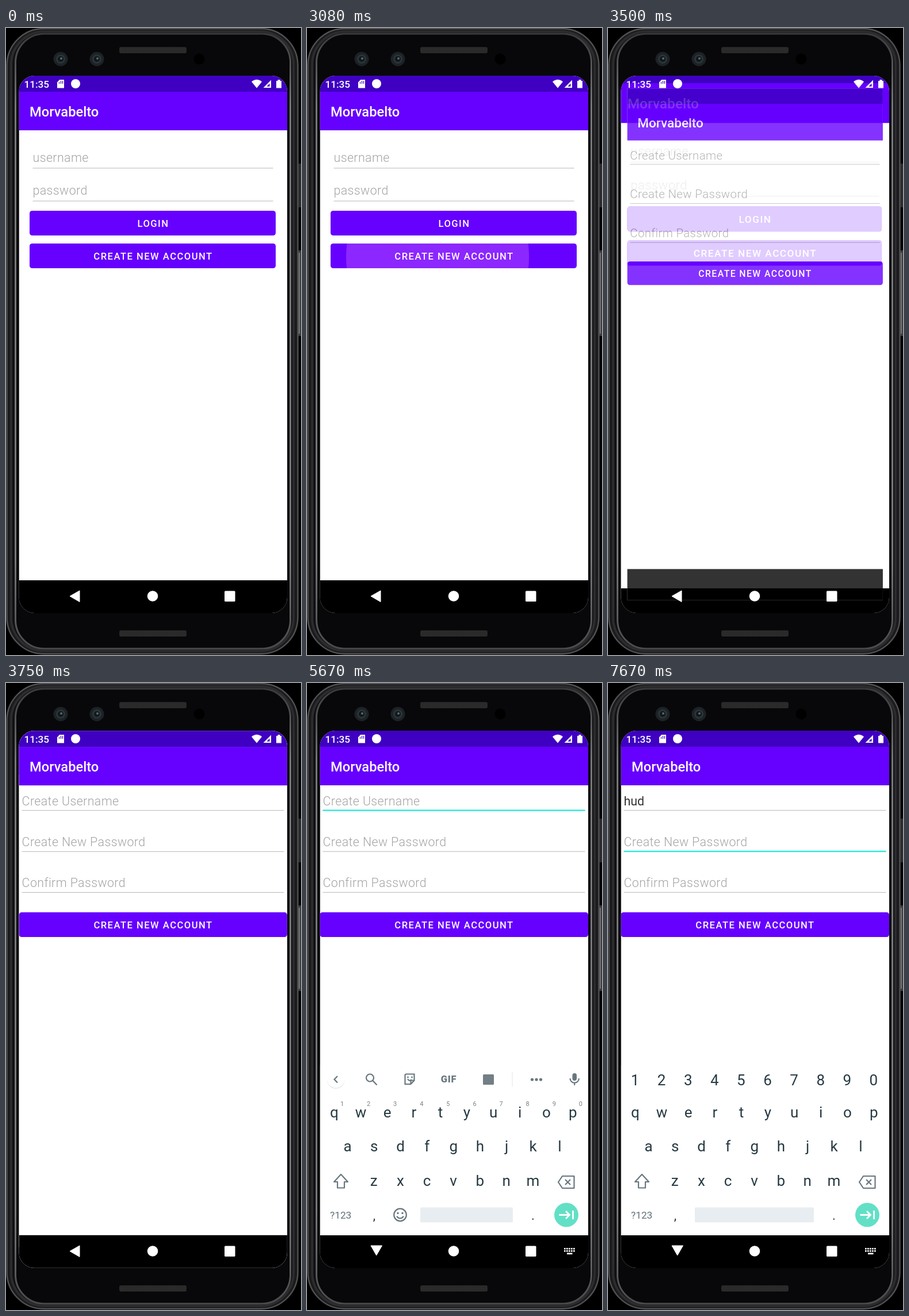
Write an HTML page that moves like this. It is 513 px wide and 1091 px high and loops after 8 s.

```html
<!DOCTYPE html>
<html lang="en">
<head>
<meta charset="utf-8">
<title>Sign-up flow</title>
<style>
html, body { margin: 0; width: 100%; height: 100%; overflow: hidden; background: #000; }
svg { display: block; width: 513px; height: 1091px; font-family: Roboto, sans-serif; }
.hint { font-size: 21.4px; font-weight: 300; letter-spacing: .4px; fill: #a4a4a4; }
.value { font-size: 21.4px; fill: #333; }
.btn { font-size: 16.6px; font-weight: 500; letter-spacing: 1.48px; fill: #fff; text-anchor: middle; }
.title { font-size: 23.7px; font-weight: 500; fill: #fff; }
.key { font-size: 26px; fill: #263a42; text-anchor: middle; }
.mini { font-size: 11px; fill: #75838a; text-anchor: middle; }
.word { font-size: 19px; fill: #3c4a50; text-anchor: middle; }
.icon { fill: none; stroke: #68777e; stroke-width: 2.2; }
</style>
</head>
<body>
<svg id="stage" viewBox="0 0 513 1091" xmlns="http://www.w3.org/2000/svg"></svg>
<script>
const LOOP = 8000, STEP = 1000 / 12;
const PURPLE = '#6600ff', DARK = '#3f00c2', CYAN = '#2fe8dc', APP = 'Morvabelto', USER = 'hud';

const rect = (x, y, w, h, fill, more = '') =>
  `<rect x="${x}" y="${y}" width="${w}" height="${h}" fill="${fill}" ${more}/>`;
const circle = (x, y, r, fill, more = '') =>
  `<circle cx="${x}" cy="${y}" r="${r}" fill="${fill}" ${more}/>`;
const path = (d, fill, more = '') => `<path d="${d}" fill="${fill}" ${more}/>`;
const text = (x, y, cls, s, more = '') => `<text x="${x}" y="${y}" class="${cls}" ${more}>${s}</text>`;
const group = (id, body, more = '') => `<g id="${id}" ${more}>${body}</g>`;
const icon = (d, more = '') => `<path class="icon" d="${d}" ${more}/>`;

function phone() {
  const grille = y => rect(197, y, 117, 11, '#262626', 'rx="3"') + rect(198, y + 1, 115, 9, 'url(#mesh)');
  const lens = x => circle(x, 54, 12.5, '#1c2225') + circle(x, 54, 8, '#2b3438') +
    circle(x, 54, 5, '#12181b') + circle(x + 1, 53, 2, '#59686e');
  return rect(506, 236, 9, 76, '#2b2b2d', 'rx="2"') +
    rect(506, 387, 9, 149, '#3a3a3c', 'rx="2"') + rect(509, 391, 2, 141, '#777') +
    rect(1.5, 1, 506, 1088, '#1b1b1d', 'rx="64" stroke="#525254" stroke-width="2.4"') +
    rect(9, 6, 491, 1078, '#111113', 'rx="58" stroke="#2c2c2e" stroke-width="4"') +
    rect(16.5, 10, 478, 1070, '#08080a', 'rx="50" stroke="url(#rim)" stroke-width="3"') +
    rect(20, 13, 471, 1064, '#08080a', 'rx="47"') +
    grille(33) + grille(1048) + lens(95) + lens(158) + circle(336, 54, 9.5, '#000');
}

function windowBase() {
  return rect(22.5, 83, 466.5, 935, '#fff') + rect(22.5, 83, 466.5, 28.5, DARK) +
    rect(22.5, 111, 466.5, 67, PURPLE) + text(41, 154, 'title', APP) +
    rect(22.5, 961, 466.5, 57, '#000');
}
const line = (x, y, w) => rect(x, y, w, 1.1, '#bdbdbd');
const button = (x, y, w, label) => rect(x, y, w, 43, PURPLE, 'rx="4.5"');

function loginScreen() {
  return windowBase() + text(46.5, 233, 'hint', 'username') + line(46.5, 243.3, 418) +
    text(46.5, 290, 'hint', 'password') + line(46.5, 300.5, 418) +
    button(41, 318, 428) + text(256, 346, 'btn', 'LOGIN') +
    button(41, 375, 428) +
    group('ripple', '<circle id="wave" cy="398" fill="#8c27ff"/>', 'clip-path="url(#tap)"') +
    text(256, 403, 'btn', 'CREATE NEW ACCOUNT');
}

function signupScreen() {
  return windowBase() + text(27.5, 212.5, 'hint', 'Create Username', 'id="nameHint"') +
    text(27.5, 212.5, 'value', '', 'id="name"') +
    text(27.5, 283.7, 'hint', 'Create New Password') + text(27.5, 355, 'hint', 'Confirm Password') +
    [221, 292.6, 363.8].map(y => line(27.5, y, 456)).join('') +
    rect(27.5, 220.4, 456, 2.4, CYAN, 'id="focus"') + rect(27, 192, 2, 25, CYAN, 'id="caret"') +
    button(22.5, 399, 466.5) + text(256, 427, 'btn', 'CREATE NEW ACCOUNT');
}

function statusIcons() {
  return text(31.5, 103.5, '', '11:35', 'font-size="17.2" font-weight="500" fill="#fff"') +
    path('M93 90h8v14.5h-12v-10z', '#fff') +
    path('M92.5 94v3M95.5 92v5M98.5 92v5', 'none', `stroke="${DARK}" stroke-width="1.2"`) +
    circle(121, 97, 8, '#fff') +
    path('M427 93.5Q436 86 445 93.5L436 104.500z', '#fff') +
    path('M461 90.500V104H447.500z', '#fff') + path('M458.500 96.500v5.200h-5.200z', DARK) +
    path('M470 92h2.500v-2h4v2h2.500v12.500h-9z', '#fff');
}

function navIcons() {
  const dots = Array.from({length: 10}, (_, i) =>
    rect(447 + (i % 5) * 4, 983 + (i / 5 | 0) * 4, 2.7, 2.7, '#fff')).join('');
  return group('back', path('M111 988.700L128 979V998.500z', '#fff', 'stroke="#fff" stroke-linejoin="round"')) +
    circle(255, 988.5, 9.3, '#fff') + rect(380, 979.500, 18.500, 18.500, '#fff', 'rx="1.5"') +
    group('down', path('M111 979H130.500L120.700 996z', '#fff', 'stroke="#fff" stroke-linejoin="round"') +
      dots + rect(452, 991.500, 9.500, 2.700, '#fff'));
}

function keyboard() {
  const row = (s, x, y, cls = 'key', gap = 46.1) =>
    [...s].map((c, i) => text((x + gap * i).toFixed(1), y, cls, c)).join('');
  const arrow = icon('M59 855l-12 13h6v10.500h12V868h6z', 'stroke-linejoin="round"');
  const erase = icon('M444 858h20.500v21H444l-7-10.500zM449 864l9 9m0-9l-9 9', 'stroke-linejoin="round"');
  const enter = circle(451, 925.500, 21, '#62e0c6') +
    path('M438.500 925.500h18m-6.500-6.500l6.500 6.500-6.500 6.500M462.500 918v15', 'none', 'stroke="#fff" stroke-width="2.8"');
  const mic = group('mic', rect(461.500, 679, 7.500, 13, '#68777e', 'rx="3.700"') +
    icon('M457.500 688a7.700 7.700 0 0 0 15.400 0M465.200 696v4', 'stroke-width="2"'));
  const tools = group('tools',
    circle(50, 691, 15, '#e6e8e9') + circle(50, 689.500, 15, '#fff') + icon('M53 684l-5.500 5.700 5.500 5.700') +
    `<circle class="icon" cx="109.500" cy="687" r="6.500"/>` + icon('M114 691.500l7.500 8') +
    icon('M172 680.500h14.500v11l-6 6.500H170.500V682zM186.500 691.500h-6v6.500M175 689q3 5 7 1') +
    circle(175.5, 686, 1.4, '#68777e') + circle(182.5, 686, 1.4, '#68777e') +
    text(246.500, 695, '', 'GIF', 'font-size="16.500" font-weight="900" fill="#68777e" text-anchor="middle" letter-spacing=".8"') +
    rect(306, 681, 19, 18, '#737f85', 'rx="1.500"') + rect(356.500, 677, 1, 25, '#dfe3e5') +
    [391.500, 399, 406.500].map(x => circle(x, 690, 2.600, '#68777e')).join(''));
  const words = group('words', icon('M47 684l5.500 5.700-5.500 5.700') +
    [125, 246, 368].map(x => text(x, 696, 'word', '')).join('') +
    rect(185, 680, 1, 19, '#dfe3e5') + rect(307, 680, 1, 19, '#dfe3e5'));
  const smile = group('smile', `<circle class="icon" cx="162" cy="925.500" r="10.800"/>` +
    circle(158, 922.5, 1.7, '#68777e') + circle(166, 922.5, 1.7, '#68777e') + icon('M156 928q6 7 12 0'));
  return rect(22.5, 665, 466.5, 296, '#fff') + tools + words + mic +
    group('minis', row('1234567890', 61, 736, 'mini')) + group('digits', row('1234567890', 47, 700)) +
    row('qwertyuiop', 47.5, 756) + row('asdfghjkl', 70.5, 815) + row('zxcvbnm', 116.3, 875) +
    arrow + erase + text(40, 932, '', '?123', 'font-size="17.300" fill="#5f6f76"') +
    text(117, 934, 'key', ',', 'style="font-size:22px"') + text(393, 934, 'key', '.', 'style="font-size:22px"') +
    smile + rect(197, 912.500, 161, 26, '#e8edf1', 'id="space" rx="1.500"') + enter;
}

const stage = document.getElementById('stage');
stage.innerHTML = `<defs>
  <linearGradient id="rim" x1="0" y1="0" x2="0" y2="1">
    <stop offset="0" stop-color="#3a3a3c"/><stop offset=".12" stop-color="#77777a"/>
    <stop offset=".85" stop-color="#77777a"/><stop offset="1" stop-color="#4a4a4c"/>
  </linearGradient>
  <pattern id="mesh" width="3" height="3" patternUnits="userSpaceOnUse">${rect(0, 0, 1.5, 1.5, '#363636')}</pattern>
  <clipPath id="screen">${rect(22.5, 83, 466.5, 935, '#000', 'rx="27"')}</clipPath>
  <clipPath id="tap">${rect(41, 375, 428, 43, '#000', 'rx="4.5"')}</clipPath>
  <clipPath id="aboveNav">${rect(22.5, 83, 466.5, 878, '#000')}</clipPath>
</defs>` + rect(0, 0, 513, 1091, '#000') + phone() +
  `<g clip-path="url(#screen)">` + group('login', loginScreen()) + group('signup', signupScreen()) +
  `<g clip-path="url(#aboveNav)">` + group('board', keyboard()) + '</g>' +
  statusIcons() + navIcons() + '</g>';

const el = {};
stage.querySelectorAll('[id]').forEach(n => el[n.id] = n);
const wordNodes = [...el.words.querySelectorAll('text')];

const clamp = v => Math.max(0, Math.min(1, v));
const mix = (a, b, k) => a + (b - a) * k;
const set = (id, attrs) => { for (const k in attrs) el[id].setAttribute(k, attrs[k]); };
const show = (id, on) => set(id, {visibility: on ? 'visible' : 'hidden'});
const zoom = (id, s) => set(id, {transform: `translate(256 550) scale(${s}) translate(-256 -550)`});

// Two joined Bézier pieces: quick start, very long settle.
const cubic = (a, b, c, d, u) => {
  const v = 1 - u;
  return a * v * v * v + 3 * b * u * v * v + 3 * c * u * u * v + d * u * u * u;
};
function settle(x) {
  if (x <= 0 || x >= 1) return clamp(x);
  const first = x < 1 / 6;
  const px = first ? [0, .05, .133333, 1 / 6] : [1 / 6, .208333, .25, 1];
  const py = first ? [0, 0, .06, .4] : [.4, .82, 1, 1];
  let lo = 0, hi = 1;
  for (let i = 0; i < 24; i++) {
    const m = (lo + hi) / 2;
    if (cubic(...px, m) < x) lo = m; else hi = m;
  }
  return cubic(...py, lo);
}

function suggestions(t) {
  if (t < 6160) return ['he', 'h', 'how'];
  if (t < 6330) return ['have', 'h', 'how'];
  if (t < 6660) return ['hug', 'hu', 'huge'];
  return ['hub', USER, 'huge'];
}

function draw(time) {
  const t = Math.floor((time + 4) / STEP) * STEP;

  const grow = clamp((t - 3083) / 150);
  set('wave', {cx: mix(227, 255, grow), r: mix(159, 222, grow)});
  set('ripple', {opacity: t < 3075 ? 0 : 1 - clamp((t - 3255) / 150)});

  const open = settle((t - 3415) / 400);
  zoom('login', mix(1, 1.05, open));
  zoom('signup', mix(.85, 1, open));
  set('signup', {opacity: clamp((t - 3417) / 104)});
  show('login', t < 3815);

  const typed = [5995, 6330, 6580].filter(s => t >= s).length;
  el.name.textContent = USER.slice(0, typed);
  set('nameHint', {opacity: typed ? 0 : 1});

  const second = t >= 7080;
  set('focus', {opacity: t >= 4660 ? 1 : 0, y: second ? 291.8 : 220.4});
  const blinkOn = (t >= 4660 && t < 5660) || (t >= 5995 && t < 7080) || (t >= 7160 && t < 7660);
  const end = typed && !second ? el.name.getComputedTextLength() : 0;
  set('caret', {opacity: blinkOn ? 1 : 0, x: 27 + end, y: second ? 263.5 : 192});

  const rise = clamp((t - 4770) / 310), eased = 1 - (1 - rise) * (1 - rise);
  set('board', {transform: `translate(0 ${296 * (1 - eased)})`, opacity: clamp(rise * 2)});
  show('down', t >= 4910);
  show('back', t < 4910);

  const secret = t >= 7240;
  show('tools', !typed);
  show('words', typed && !secret);
  suggestions(t).forEach((w, i) => wordNodes[i].textContent = w);
  ['mic', 'minis', 'smile'].forEach(id => show(id, !secret));
  show('digits', secret);
  set('space', secret ? {x: 151, width: 207} : {x: 197, width: 161});
}

const start = performance.now();
function tick() {
  draw((performance.now() - start) % LOOP);
  requestAnimationFrame(tick);
}
tick();
</script>
</body>
</html>
```
